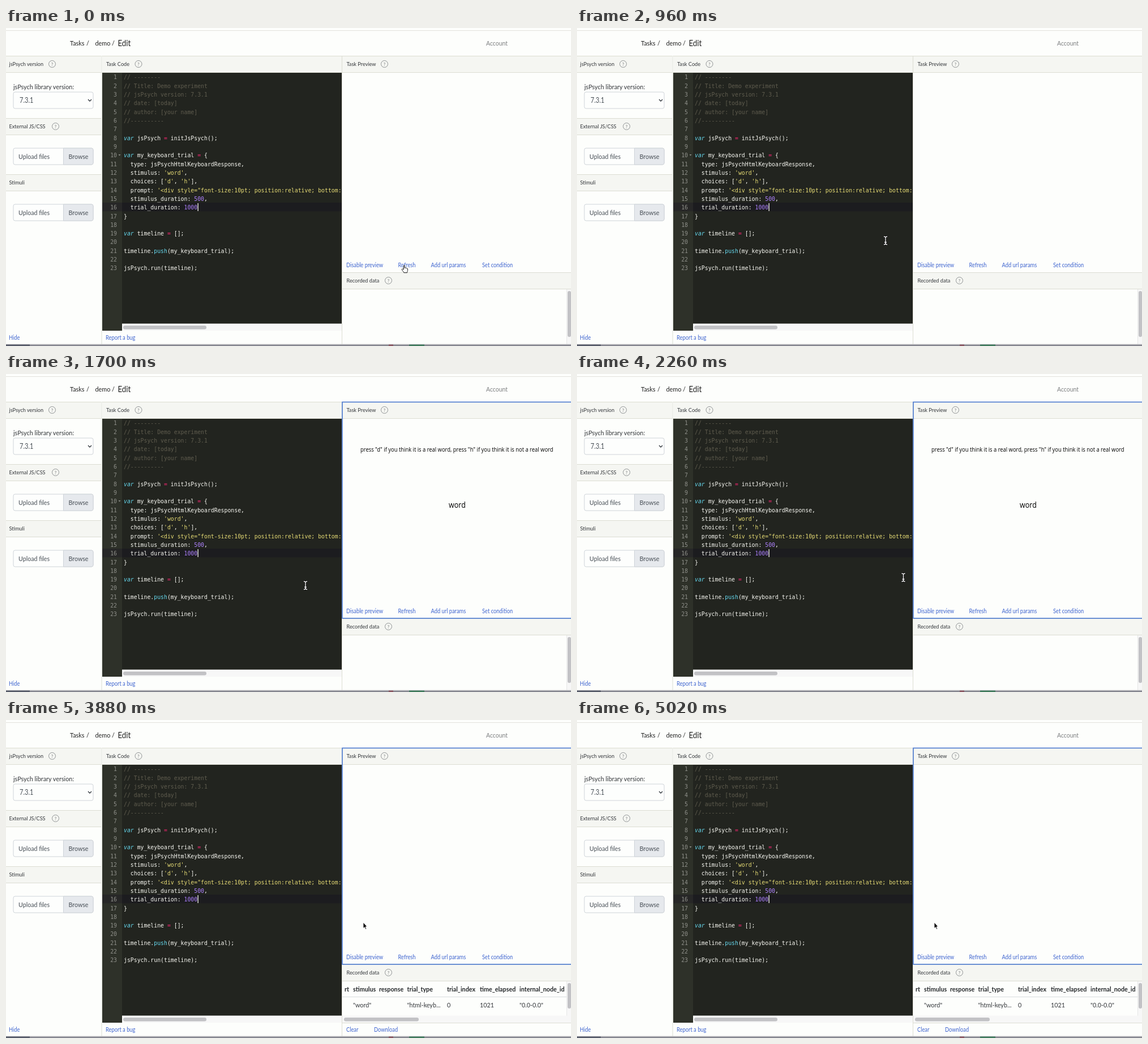
Write an HTML page that moves like this. It is 998 px wide and 561 px high and loops after 5.04 s.

```html
<!DOCTYPE html>
<html lang="en">
<head>
<meta charset="utf-8">
<title>Task editor</title>
<style>
html, body { margin: 0; width: 100%; height: 100%; overflow: hidden; background: #fdfefc; }
svg { display: block; }
text { white-space: pre; font-family: Lato, "Open Sans", sans-serif; }
.code { font-family: "DejaVu Sans Mono", "Liberation Mono", monospace; }
.page { font-family: "Open Sans", "Noto Sans", sans-serif; }
.kw { fill: #66d9ef; font-style: italic; }
.fn { fill: #66d9ef; }
.op { fill: #f92672; }
.num { fill: #ae81ff; }
.str { fill: #e6db74; }
.rem { fill: #5f5c4e; }
</style>
</head>
<body>
<svg id="stage" width="998" height="561" viewBox="0 0 998 561"></svg>
<script>
const SQUASH = 0.89;
const LINE = '#dcddd3', BAR = '#f5f6f2', LINK = '#3e64cf', INK = '#34373b', GREY = '#c2c2c5';

const esc = s => s.replace(/&/g, '&amp;').replace(/</g, '&lt;');
const rect = (x, y, w, h, fill, more = '') =>
  `<rect x="${x}" y="${y}" width="${w}" height="${h}" fill="${fill}" ${more}/>`;
const markup = (x, y, size, inner, fill, more = '') =>
  `<text transform="translate(${x} ${y}) scale(${SQUASH} 1)" font-size="${size}" fill="${fill}" ${more}>${inner}</text>`;
const label = (x, y, size, s, fill = INK, more) => markup(x, y, size, esc(s), fill, more);
const link = (x, y, s) => label(x, y, 10.5, s, LINK);
const help = (x, y) =>
  `<circle cx="${x}" cy="${y}" r="6" fill="none" stroke="#85888b" stroke-width=".9"/>` +
  label(x, y + 3, 8.5, '?', '#74777a', 'text-anchor="middle"');
const bar = (x, y, w, title, iconX) =>
  rect(x, y, w, 28, BAR) + rect(x, y - 1, w, 1, LINE) + rect(x, y + 28, w, 1, LINE) +
  label(x ? x + 7.5 : 5.5, y + 17.3, 10.3, title) + (iconX ? help(iconX, y + 13.5) : '');
const upload = y =>
  rect(13, y, 141, 29, '#fdfefd', 'rx="3" stroke="#cfd4d9"') +
  `<path d="M101.5 ${y}H151a3 3 0 0 1 3 3v23a3 3 0 0 1-3 3H101.5z" fill="#e6e9ed" stroke="#cfd4d9"/>` +
  label(22, y + 18.6, 12, 'Upload files', '#495057') + label(110.5, y + 18.6, 12, 'Browse', '#495057');

const source = `// --------
// Title: Demo experiment
// jsPsych version: 7.3.1
// date: [today]
// author: [your name]
//----------

var jsPsych = initJsPsych();

var my_keyboard_trial = {
  type: jsPsychHtmlKeyboardResponse,
  stimulus: 'word',
  choices: ['d', 'h'],
  prompt: '<div style="font-size:10pt; position:relative; bottom:
  stimulus_duration: 500,
  trial_duration: 1000
}

var timeline = [];

timeline.push(my_keyboard_trial);

jsPsych.run(timeline);`.split('\n');

const kinds = ['rem', 'str', 'kw', 'fn', 'num', 'op'];
const token = /(\/\/.*)|('[^']*'?)|(\bvar\b)|(\bpush\b)|(\b\d+\b)|(=)/g;
function colour(line) {
  let out = '', last = 0;
  for (const m of line.matchAll(token)) {
    const kind = kinds[m.slice(1).findIndex(Boolean)];
    out += esc(line.slice(last, m.index)) + `<tspan class="${kind}">${esc(m[0])}</tspan>`;
    last = m.index + m[0].length;
  }
  return out + esc(line.slice(last));
}
const codeLine = (line, i) => {
  const y = 90.4 + i * 15.32;
  return label(196, y, 11.06, String(i + 1), '#8f908a', 'class="code" text-anchor="end"') +
    markup(208, y, 11.06, colour(line), '#f8f8f2', 'class="code"');
};

const header =
  rect(0, 4, 998, 1, '#e2e2dc') +
  label(113, 31, 12.2, 'Tasks', '#222') + label(142, 31, 12.2, '/', '#222') +
  label(157.5, 31, 12.2, 'demo', '#222') + label(187, 31, 12.2, '/', '#222') +
  label(197.5, 32, 14.9, 'Edit', '#222') + label(848, 31, 11.8, 'Account', '#7d7f80');

const left =
  bar(0, 50, 168, 'jsPsych version', 81.5) +
  label(13, 108, 12.2, 'jsPsych library version:') +
  rect(13, 113, 141, 29, '#fdfefd', 'rx="3" stroke="#cfd4d9"') +
  label(24, 132, 12.4, '7.3.1', '#495057') +
  '<path d="M145 126l3 3 3-3" fill="none" stroke="#343a40" stroke-width="1.4"/>' +
  bar(0, 160, 168, 'External JS/CSS', 87.5) + upload(212) +
  bar(0, 259, 168, 'Stimuli') + upload(311) +
  link(5, 549.7, 'Hide') + rect(168.5, 49, 1, 509, LINE);

const editor =
  bar(169.5, 50, 424, 'Task Code', 234) +
  rect(170, 79, 423, 455, '#22241f') + rect(170, 79, 35, 455, '#2e3129') +
  rect(170, 308, 35, 15.3, '#272727') + rect(205, 308, 388, 15.3, '#1c1c1f') +
  source.map(codeLine).join('') +
  '<path d="M198.5 223h4l-2 2.6z" fill="#8f908a"/>' +
  rect(338.5, 309, 1.3, 14, '#f8f8f0') +
  rect(205, 521.5, 388, 12.5, '#f7f7f7') + rect(207, 525, 147, 6.5, GREY, 'rx="3.2"') +
  link(176, 549.7, 'Report a bug');

const titles = [[598, 'rt'], [613, 'stimulus'], [659, 'response'], [708.5, 'trial_type'],
  [779, 'trial_index'], [837, 'time_elapsed'], [907, 'internal_node_id']];
const cells = [[613, '"word"'], [708.5, '"html-keyb...'], [779, '0'], [837, '1021'], [907, '"0.0-0.0"']];

const right =
  rect(593, 49, 405, 509, '#fdfefc') + rect(593, 49, 1, 509, LINE) +
  bar(594, 50, 404, 'Task Preview', 668.5) +
  link(601, 422, 'Disable preview') + link(692.5, 422, 'Refresh') +
  link(750.5, 422, 'Add url params') + link(841, 422, 'Set condition') +
  bar(594, 432, 404, 'Recorded data', 675.5) +
  `<g id="empty">${rect(990, 461, 8, 97, '#f7f7f7')}${rect(990, 461, 1, 97, '#e6e6e6')}
    ${rect(992, 464, 6, 81, GREY, 'rx="3"')}</g>` +
  `<g id="data">${rect(990, 461, 8, 61, '#f7f7f7')}${rect(990, 461, 1, 61, '#e6e6e6')}
    ${rect(992, 464, 6, 45, GREY, 'rx="3"')}
    ${rect(594, 488, 396, 1, '#d9dcdf')}${rect(594, 521.5, 404, 12.5, '#f7f7f7')}
    ${rect(597, 525, 132, 6.5, GREY, 'rx="3.2"')}${rect(594, 534, 404, 1, LINE)}
    ${titles.map(([x, s]) => label(x, 479, 12.1, s, '#24272a', 'font-weight="700"')).join('')}
    ${cells.map(([x, s]) => label(x, 506.5, 12.1, s)).join('')}
    ${link(601, 549.7, 'Clear')}${link(650, 549.7, 'Download')}</g>` +
  '<rect id="focus" x="594" y="49.5" width="405" height="381.5" fill="none" stroke="#4a78cf" stroke-width="1.6"/>' +
  `<g id="prompt">${label(626, 136.8, 10.58,
    'press "d" if you think it is a real word, press "h" if you think it is not a real word', '#000', 'class="page"')}</g>` +
  `<g id="word">${label(782, 236, 14.1, 'word', '#000', 'class="page"')}</g>`;

const desktop =
  rect(0, 557.5, 998, 1, '#c9c9cc') + rect(0, 558.5, 998, 2.5, '#85868f') +
  rect(0, 558.5, 42, 2.5, '#555a68') + rect(712, 558.5, 27, 2.5, '#3f7a5c') +
  rect(676, 558.5, 8, 2.5, '#8a5560');

// Each pointer has its hot spot or middle at 0,0.
const pointers =
  `<g id="pointer">
    <path id="hand" d="M-1.6 1.5V-4.6c0-1.5 2-1.5 2 0v3.4c.5-.7 1.8-.5 1.9.4.6-.6 1.6-.3 1.7.5.7-.4 1.5 0 1.5.9V3c0 1.5-1 2-1 4.2H-1.2C-1.4 5.6-3.7 4-4.6 1.9c-.6-1.3.7-2 1.6-1.2z"
      fill="#fff" stroke="#111" stroke-width="1"/>
    <g id="beam" fill="none" stroke-linecap="round">
      ${[['#111', 3], ['#fff', 1.3]].map(([c, w]) =>
        `<path d="M-2.6-7Q0-7 0-5V5Q0 7-2.6 7M2.6-7Q0-7 0-5M0 5Q0 7 2.6 7M-1.5 3H1.5" stroke="${c}" stroke-width="${w}"/>`).join('')}
    </g>
    <path id="arrow" d="M-2-6V4.6L.4 2.4 2 6.3 3.7 5.6 2.1 1.8H5z" fill="#000" stroke="#fff" stroke-width=".9"/>
  </g>`;

const stage = document.getElementById('stage');
stage.innerHTML = header + left + editor + right + desktop + pointers;
const part = id => document.getElementById(id);
const show = (id, on) => part(id).setAttribute('visibility', on ? 'visible' : 'hidden');

const LOOP = 5040, START = 1320, WORD_OFF = 2840, END = 3740;
const path = [[0, 704, 424.5], [620, 704, 424.5], [940, 545, 375], [1100, 545, 375],
  [1660, 529, 373], [1800, 529, 373], [2260, 576.5, 359], [2700, 633, 363], [LOOP, 633, 363]];

function draw(now) {
  const t = now % LOOP;
  const i = path.findIndex(p => p[0] > t);
  const [t0, x0, y0] = path[i - 1], [t1, x1, y1] = path[i];
  const u = (t - t0) / (t1 - t0), k = u * u * (3 - 2 * u);
  const x = x0 + (x1 - x0) * k, y = y0 + (y1 - y0) * k;
  part('pointer').setAttribute('transform', `translate(${x} ${y})`);
  const hand = x > 690 && y > 412, beam = x < 594;
  show('hand', hand);
  show('beam', beam);
  show('arrow', !hand && !beam);
  show('focus', t >= START);
  show('prompt', t >= START && t < END);
  show('word', t >= START && t < WORD_OFF);
  show('data', t >= END);
  show('empty', t < END);
}
const begin = performance.now();
function tick() {
  draw(performance.now() - begin);
  requestAnimationFrame(tick);
}
tick();
</script>
</body>
</html>
```
